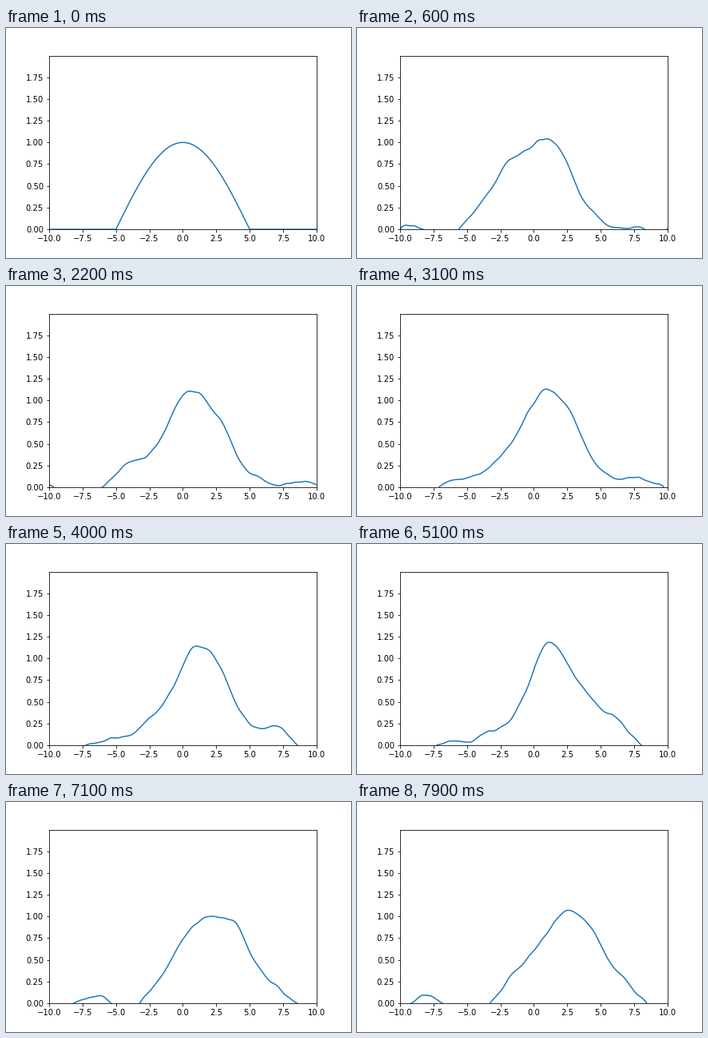
A matplotlib script for the animation above (8000 ms loop, 432 by 288 pixels).

```python
import numpy as np
import matplotlib.pyplot as plt
from matplotlib.animation import FuncAnimation

FRAMES, INTERVAL = 80, 100
DT = 0.1            # model time per frame
SUB = 120           # solver steps per frame
L, N = 20, 200
DX = L / N

x = -L / 2 + DX * np.arange(N + 1)


def slope(u):
    """Periodic KdV, u_t = -u u_x - u_xxx, by central differences."""
    p = np.concatenate([u[-2:], u, u[:2]])
    l2, l1, r1, r2 = p[:-4], p[1:-3], p[3:-1], p[4:]
    diff = r1 - l1
    steepen = (l1 + u + r1) / 3 * diff / (2 * DX)
    disperse = (r2 - l2 - 2 * diff) / (2 * DX**3)
    return -steepen - disperse


def rk4(u, h):
    a = slope(u)
    b = slope(u + h / 2 * a)
    c = slope(u + h / 2 * b)
    d = slope(u + h * c)
    return u + h / 6 * (a + 2 * b + 2 * c + d)


def solve():
    u = np.maximum(np.cos(np.pi * x[:-1] / 10), 0)
    out = [u]
    for _ in range(FRAMES - 1):
        for _ in range(SUB):
            u = rk4(u, DT / SUB)
        out.append(u)
    out = np.array(out)
    return np.column_stack([out, out[:, 0]])


wave = solve()

plt.rcParams.update({"font.family": "DejaVu Sans", "font.size": 10})
fig, ax = plt.subplots(figsize=(6, 4), dpi=72)
fig.subplots_adjust(left=0.125, right=0.9, bottom=0.125, top=0.88)
ax.set(xlim=(-10, 10), ylim=(0, 2), yticks=np.arange(0, 2, 0.25))
line, = ax.plot(x, wave[0], color="#1f77b4", lw=1.5)


def update(i):
    line.set_ydata(wave[i])
    return line,


anim = FuncAnimation(fig, update, frames=FRAMES, interval=INTERVAL,
                     repeat=True, repeat_delay=0)
plt.show()
```
